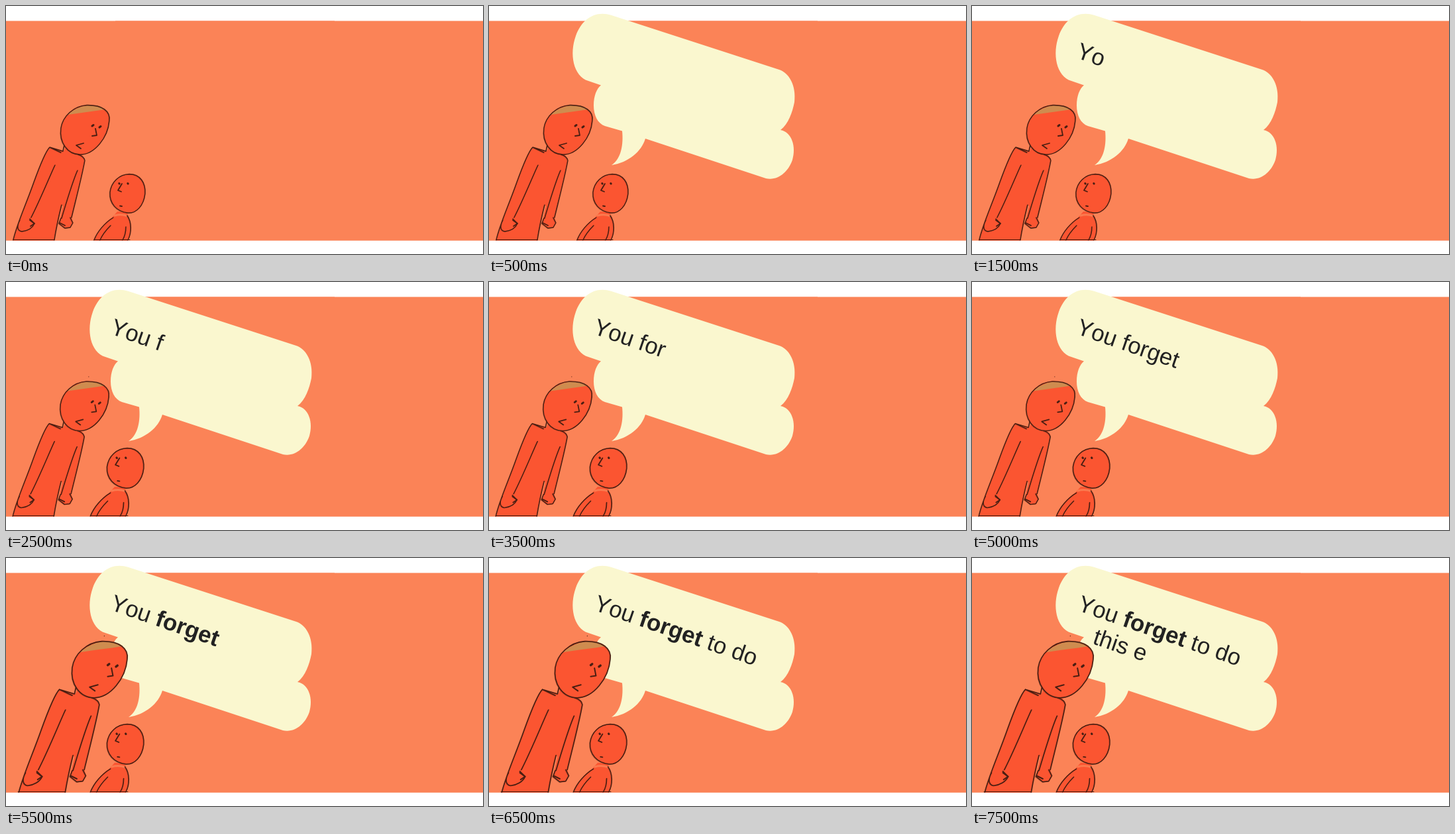
Write an HTML page with a canvas that moves like this. It is 720 px wide and 374 px high and loops after 8000 ms.

```html
<!DOCTYPE html>
<html lang="en">
<head>
<meta charset="utf-8">
<title>You forget</title>
<style>
html, body { margin: 0; width: 720px; height: 374px; overflow: hidden; background: #fff; }
canvas, svg { position: absolute; left: 0; top: 0; width: 720px; height: 374px; }
text { font: 34.9px "Liberation Sans", Arial, sans-serif; font-kerning: none; fill: #222; white-space: pre; }
.bold { font-weight: bold; }
</style>
</head>
<body>
<canvas id="stage"></canvas>
<svg viewBox="0 0 720 374">
  <g id="words">
    <text transform="translate(155.7 77.6) rotate(19.1)" xml:space="preserve"><tspan id="lead"></tspan><tspan id="verb" class="bold"></tspan><tspan id="rest"></tspan></text>
    <text id="second" transform="translate(178.7 127.7) rotate(19.1)" xml:space="preserve"></text>
  </g>
</svg>
<script>
const LOOP = 8000, STEP = 500, FLOOR = 352.5;
const INK = '#4a1e12', SKIN = '#fb5531', BACK = '#fb8357', CREAM = '#faf7cf', HAIR = '#cf8c4f';
const canvas = document.getElementById('stage');
const ctx = canvas.getContext('2d');
const el = id => document.getElementById(id);
const path = d => new Path2D(d);

const bubble = path('M185 14C160 6 140 20 131 45C121 72 127 106 150 113L169 119.5C163 124 158 135 158 150C158 165 164 177 175 181L201 188.5C203 208 200 230 185 240C210 236 230 220 236 200L418 260C436 264 452 250 458 232C464 212 457 190 440 187C452 178 458 160 461 145C464 120 453 101 438 96Z');

const adult = {
  base: [11, 73],
  fill: path('M66 213L87 219L91 211L113 222L119 231C115 256 106 290 99 319L101 327L97 335L89 335L80 328L86 302L84 300Q77 328 73 354H11C16 330 30 300 42 266C50 244 57 223 66 213Z'),
  head: path('M122 149.5C146 149 158 159 156 173C154 198 134 224 112 224C93 224 80 206 83 184C86 166 102 151 122 149.5Z'),
  hair: path('M93 164C104 154 119 149 130 150C139 150 146 152 150 156C131 159 112 161 93 164Z'),
  lines: path('M83 221L66 213C59 220 50 244 42 266C30 300 16 330 11 353M74 240C66 257 51 294 38 319M21 323C16 332 17 339 24 340C32 339 40 335 43 328L36 321M66 213L86 219L88 210M109 224Q118 227 119 233C115 256 106 290 99 319M108 248C100 266 91 297 84 320M83 320L80 328L89 335L97 334L101 327L97 319M84 300Q77 328 73 353'),
  eyes: path('M130 181L132 179.5M141 183L143 181.5'),
  face: path('M135 185L137 195L130 196M117 207L106 210L113 215M36 323L43 328L37 332M81 327L89 331')
};

const child = {
  base: [133, 187],
  fill: path('M168 310L182 311L184 315C189 325 190 340 184 354H133C137 341 148 327 160 319Z'),
  head: path('M186 253.5C203 253.5 211 267 210 283C208 301 197 313 184 312C167 310 156 298 157 281C159 265 171 254 186 253.5Z'),
  neck: path('M164 316Q174 313 184 317'),
  lines: path('M162 319C149 327 138 340 133 353M158 331C150 339 145 346 142 353M183 316C190 326 190 342 184 353M181 333Q181 345 176 353'),
  eyes: path('M170.8 267.5L171.2 268M183.8 267.5L184.2 268'),
  face: path('M175 268L169 278L174 280M172 301.5L175 302')
};

function stroke(p, color, width) {
  ctx.strokeStyle = color;
  ctx.lineWidth = width;
  ctx.stroke(p);
}

// A main line with a faint second pass, like a soft pencil.
function sketch(p) {
  stroke(p, INK, 1.4);
  ctx.save();
  ctx.translate(-0.7, 0.5);
  ctx.globalAlpha = 0.4;
  stroke(p, INK, 1.1);
  ctx.restore();
}

function person(p, kx, ky, dx, dy, speck) {
  ctx.save();
  ctx.translate(dx, dy);
  ctx.scale(kx, ky);
  ctx.fillStyle = SKIN;
  ctx.fill(p.fill);
  if (p.neck) stroke(p.neck, '#fb7a4f', 3);
  sketch(p.lines);
  const foot = (FLOOR - dy) / ky;
  stroke(path(`M${p.base[0]} ${foot}H${p.base[1]}`), INK, 1);
  ctx.fillStyle = SKIN;
  ctx.fill(p.head);
  if (p.hair) {
    ctx.fillStyle = HAIR;
    ctx.fill(p.hair);
  }
  sketch(p.head);
  stroke(p.face, INK, 1.8);
  stroke(p.eyes, INK, 3);
  if (speck) {
    ctx.fillStyle = INK;
    ctx.fillRect(125, 142, 1, 1);
  }
  ctx.restore();
}

function type(step) {
  const full = 'You forget';
  const bold = step >= 11;
  el('lead').textContent = bold ? 'You ' : full.slice(0, step < 4 ? Math.max(0, step - 1) : step);
  el('verb').textContent = bold ? 'forget' : '';
  el('rest').textContent = step < 12 ? '' : step < 13 ? ' to' : ' to do';
  el('second').textContent = step < 14 ? '' : step < 15 ? 'this' : 'this e';
  const shift = step < 12 ? 0 : step < 14 ? 1 : 2;
  el('words').setAttribute('transform', `translate(${shift} ${shift / 2})`);
}

function draw(step) {
  const ratio = window.devicePixelRatio || 1;
  canvas.width = 720 * ratio;
  canvas.height = 374 * ratio;
  ctx.scale(ratio, ratio);
  ctx.lineCap = ctx.lineJoin = 'round';
  ctx.fillStyle = '#fff';
  ctx.fillRect(0, 0, 720, 374);
  ctx.fillStyle = BACK;
  ctx.fillRect(0, 22.5, 720, 331.3);
  ctx.fillRect(165, 22.5, 331, 0.5);
  if (step >= 1) {
    ctx.fillStyle = CREAM;
    ctx.fill(bubble);
  }
  ctx.save();
  ctx.beginPath();
  ctx.rect(0, 0, 720, 353.8);
  ctx.clip();
  if (step < 4) person(child, 1, 1, 0, 0);
  else person(child, 1.045, 1.03, -11.5, -10.6);
  if (step < 4) person(adult, 1, 1, 0, 0);
  else if (step < 11) person(adult, 1, 1, -0.7, 0.4, true);
  else person(adult, 1.137, 1.143, 5.7, -45.3, true);
  ctx.restore();
  type(step);
}

let last = -1;
const start = performance.now();
function tick() {
  const step = Math.floor(((performance.now() - start) % LOOP) / STEP);
  if (step !== last) draw(last = step);
  requestAnimationFrame(tick);
}
tick();
</script>
</body>
</html>
```
